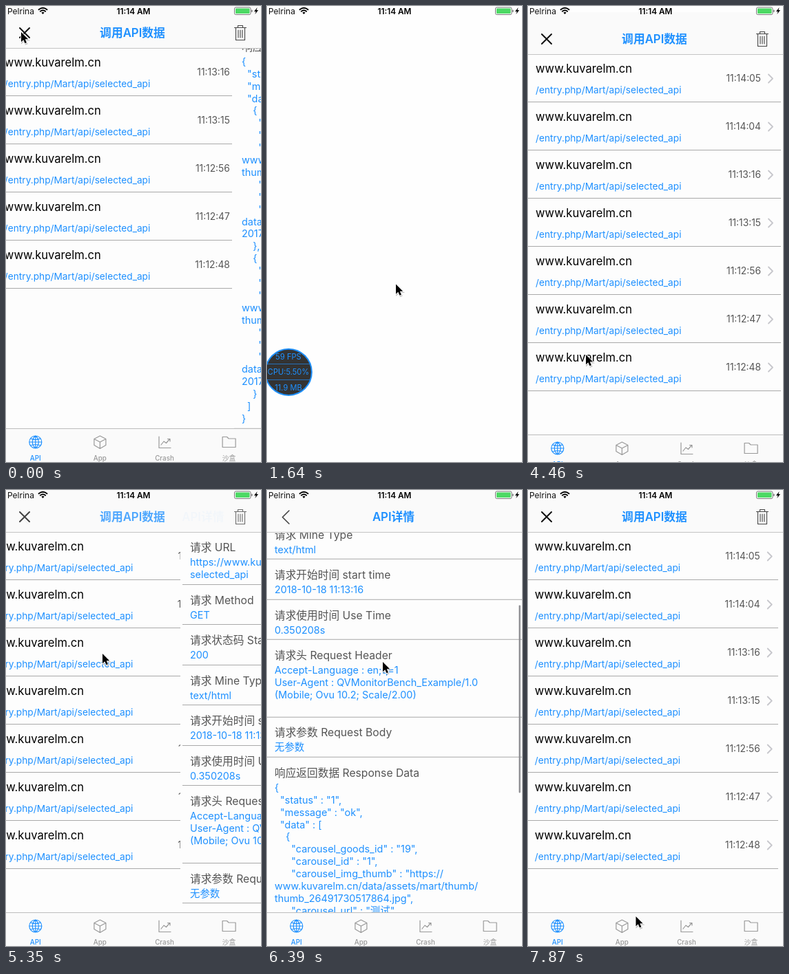
Animation of 370x663 px, one loop 8000 ms. Source, as an HTML page:

```html
<!DOCTYPE html>
<html lang="zh">
<head>
<meta charset="utf-8">
<title>API debugger</title>
<style>
  html, body { margin: 0; width: 100%; height: 100%; overflow: hidden; background: #fefefe; }
  svg { display: block; }
  text { white-space: pre; font-family: Inter, "Noto Sans CJK SC", "Noto Sans CJK", sans-serif; }
  .line { fill: none; stroke-linecap: round; stroke-linejoin: round; }
</style>
</head>
<body>
<svg id="stage" width="370" height="663" viewBox="0 0 370 663"></svg>
<script>
const W = 370, H = 663, TOP = 61, BOTTOM = 614;
const LOOP = 8000, BEAT = 148.5;   // the picture refreshes once per beat
const BLUE = '#1e90ff', INK = '#555', RULE = '#a9a9a9', BAR = '#fafafa', PAGE = '#fdfdfd', DIM = '#999';
const HOST = 'www.kuvarelm.cn', ROUTE = '/entry.php/Mart/api/', CALL = 'selected_api';
const TIMES = ['11:14:05', '11:14:04', '11:13:16', '11:13:15', '11:12:56', '11:12:47', '11:12:48'];

// y is the visual middle of the line
const text = (x, y, str, size, fill, more = '') =>
  `<text x="${x}" y="${(y + size * .36).toFixed(2)}" font-size="${size}" fill="${fill}" ${more}>${str}</text>`;
const rect = (x, y, w, h, fill, more = '') =>
  `<rect x="${x}" y="${y}" width="${w}" height="${h}" fill="${fill}" ${more}/>`;
const rule = (y, fill = RULE) => rect(0, Math.floor(y), W, 1, fill);
const path = (d, stroke, width) =>
  `<path class="line" d="${d}" stroke="${stroke}" stroke-width="${width}"/>`;
const group = (id, body) => `<g id="${id}">${body}</g>`;
const MID = 'text-anchor="middle"';

const rows = times => times.map((time, i) => {
  const y = TOP + 70 * i;
  return text(11, y + 21, HOST, 16.6, '#000')
    + text(11, y + 52, ROUTE + CALL, 13.7, BLUE)
    + text(338, y + 35, time, 13.8, INK, 'text-anchor="end"')
    + path(`M349 ${y + 29.5}l6 6l-6 6`, '#c7c7cc', 1.8)
    + rule(y + 69);
}).join('');

const item = (goods, id, thumb, url, img) => `    {
      "carousel_goods_id" : "${goods}",
      "carousel_id" : "${id}",
      "carousel_img_thumb" : "https://
${HOST}/data/assets/mart/thumb/
thumb_${thumb}.jpg",
      "carousel_url" : "${url}",
      "is_goods_id" : 1,
      "carousel_img" : "https://${HOST}/
data/assets/mart/
${img}.png"
    }`;

const SECTIONS = [
  ['请求 URL', `https://${HOST}${ROUTE}\n${CALL}`],
  ['请求 Method', 'GET'],
  ['请求状态码 Status Code', '200'],
  ['请求 Mine Type', 'text/html'],
  ['请求开始时间 start time', '2018-10-18 11:13:16'],
  ['请求使用时间 Use Time', '0.350208s'],
  ['请求头 Request Header',
    'Accept-Language : en;q=1\nUser-Agent : QVMonitorBench_Example/1.0\n(Mobile; Ovu 10.2; Scale/2.00)\n'],
  ['请求参数 Request Body', '无参数'],
  ['响应返回数据 Response Data', `{
  "status" : "1",
  "message" : "ok",
  "data" : [
${item('19', '1', '26491730517864', '测试', '20170604/7c20e8416a93b')},
${item('117', '3', '26491730683920', '', '20170428/3e81a6d904f57')}
  ]
}`]
];

let pageEnd = TOP;
function section([label, value]) {
  const y = pageEnd, lines = value.split('\n'), lead = 17.9;
  pageEnd += 40.6 + lead * lines.length;
  return text(11, y + 22.8, label, 15.7, INK)
    + lines.map((s, i) => text(11, y + 44.3 + lead * i, s, 14.4, BLUE)).join('')
    + rule(pageEnd);
}
const page = SECTIONS.map(section).join('');
const MAX_SCROLL = pageEnd - BOTTOM;

function navBar() {
  const heading = str => text(183.5, 39, str, 16.8, BLUE, MID + ' font-weight="600"');
  const cross = path('M20 32l14 14m0-14l-14 14', '#111', 2);
  const bin = path('M331.5 31.5h17m-12 0v-3h7v3m-10 .5v17.5h13v-17.5m-9.5 3v11m3-11v11m3-11v11', '#444', 1.1);
  return rect(0, 0, W, TOP, BAR) + rule(TOP, '#c4c4c4')
    + group('listNav', cross + heading('调用API数据') + bin)
    + group('detailNav', path('M32 30l-9.5 9.5l9.5 9.5', '#444', 1.6) + group('detailTitle', heading('API详情')));
}

// Icons are drawn around their own centre
const TABS = [
  ['API', 'M-9 0a9 9 0 0 1 18 0a9 9 0 0 1-18 0h18M0-9v18M0-9c-6 5-6 13 0 18c6-5 6-13 0-18M-7-5q7 3 14 0M-7 5q7-3 14 0'],
  ['App', 'M0-9l8.5 4.5v9l-8.5 5l-8.5-5v-9zM-8.5-4.5l8.5 4.5l8.5-4.5M0 0v9.5'],
  ['Crash', 'M-8-8v16.5h17M-5 4l4-5l3.5 2.5l5-6m-3 0h3.5v3.5'],
  ['沙盒', 'M-9.5 7.5v-15h6.5l2.5 2.5h10v12.5z']
];

function tabBar() {
  return rect(0, BOTTOM, W, H - BOTTOM, BAR) + rule(BOTTOM, '#bcbcbc')
    + TABS.map(([label, icon], i) => {
      const x = 42.8 + 93.6 * i, color = i ? DIM : BLUE;
      return `<g transform="translate(${x} 634)">${path(icon, color, 1.2)}</g>`
        + text(x, 657, label, 9.8, color, MID + ' font-weight="500"');
    }).join('');
}

function statusBar() {
  return text(2, 7.3, 'Pelrina', 12, '#111')
    + path('M47.5 5.2q6-5 12 0m-9.7 2.6q3.7-3 7.4 0', '#000', 1.8)
    + '<path d="M51.4 9.6q2.1-1.6 4.2 0l-2.1 2.4z"/>'
    + text(185, 7.3, '11:14 AM', 11.8, '#000', MID + ' font-weight="600"')
    + rect(331.5, 2, 23.5, 10.5, '#fff', 'rx="2" stroke="#777"')
    + rect(333, 3.5, 20.5, 7.5, '#4cd964', 'rx="1"')
    + rect(356, 5.5, 1.5, 3.5, '#777', 'rx=".7"')
    + '<path d="M364.6 2l-4.6 6h2.6l-1.2 4l4.6-6h-2.6z"/>';
}

function ballView() {
  return `<circle cx="31.3" cy="532.3" r="33.6" fill="#333" stroke="${BLUE}" stroke-width="2"/>`
    + [520, 543].map(y => rect(0, y, 64, 1, BLUE, 'opacity=".65"')).join('')
    + [0, 1, 2].map(i => text(31, 509.5 + 22.8 * i, '', 11.1, BLUE, MID + ' class="stat"')).join('');
}

const ARROW = 'M0 0V14.2L3.3 11.2L5.5 16.3L7.9 15.3L5.8 10.3H10.2Z';
document.getElementById('stage').innerHTML =
  `<clipPath id="view">${rect(0, TOP + 1, W, BOTTOM - TOP - 1, '#000')}</clipPath>`
  + rect(0, 0, W, H, '#fefefe')
  + group('modal',
    rect(0, 0, W, H, PAGE)
    + '<g clip-path="url(#view)">'
    + group('list', group('oldList', rows(TIMES.slice(2))) + group('newList', rows(TIMES)))
    + group('detail', rect(-3, TOP, W + 3, BOTTOM - TOP, PAGE) + group('page', page)
      + group('thumb', rect(365.5, 64, 2.3, 273, '#8a8a8e', 'rx="1.1"')))
    + '</g>' + navBar() + tabBar())
  + group('ball', ballView())
  + statusBar()
  + group('pointer', `<path d="${ARROW}" transform="translate(.8 1.4)" opacity=".22" stroke="#000" stroke-width="1.6"/>`
    + `<path d="${ARROW}" stroke="#fff" stroke-width="1.8" paint-order="stroke"/>`);

const clamp = v => Math.max(0, Math.min(1, v));
const smooth = v => { v = clamp(v); return v * v * (3 - 2 * v); };
// Critically damped spring from 0 to 1, d in beats since its start
const spring = d => d > 0 ? 1 - (1 + 2.8 * d) * Math.exp(-2.8 * d) : 0;

// Beat, x, y
const POINTER = [[0, 22, 38], [4, 22, 38], [7, 165, 425], [9, 165, 425], [11, 187, 404.5],
  [19, 187, 404.5], [20, 165, 415.5], [26, 25, 515], [28, 25, 515], [30, 84, 507], [34, 140, 238],
  [36, 140, 238], [40, 174, 467], [41, 174, 467], [43, 168, 250], [47, 39.5, 53], [49, 25, 42],
  [51, 25, 42], [53, 156.5, 620]];

function pointerAt(b) {
  const i = Math.max(1, POINTER.findIndex(k => k[0] >= b));
  const [b0, x0, y0] = POINTER[i - 1], [b1, x1, y1] = POINTER[i], f = (b - b0) / (b1 - b0);
  return [x0 + (x1 - x0) * f, y0 + (y1 - y0) * f];
}

function statsAt(b) {
  if (b < 11) return ['60 FPS', 'CPU:7.20%', '11.8 MB'];
  if (b < 16) return ['59 FPS', 'CPU:5.50%', '11.9 MB'];
  return ['60 FPS', 'CPU:3.90%', '12.1 MB'];
}

const el = id => document.getElementById(id);
const move = (id, x, y) => el(id).setAttribute('transform', `translate(${x} ${y})`);
const fade = (id, v) => el(id).setAttribute('opacity', clamp(v));
const stats = document.querySelectorAll('.stat');

function draw(b) {
  const closed = spring(b + 1.36) - spring(b - 35.6) + spring(b - 50.64);
  const hidden = spring(b - 3.6) - spring(b - 27.77);
  const second = b >= 20;
  const scroll = second ? smooth((b - 40.5) / 6) : 1;
  move('modal', 0, Math.round(H * hidden));
  move('detail', Math.round(W * closed), 0);
  move('list', W * (closed - 1) / 3, 0);
  move('page', 0, -MAX_SCROLL * scroll);
  move('thumb', 0, 275 * scroll);
  move('detailTitle', W * closed * .4, 0);
  move('pointer', ...pointerAt(b));
  fade('thumb', b > 40 && b < 49);
  fade('listNav', (closed - .3) / .5);
  fade('detailNav', 1 - closed * 1.4);
  fade('oldList', !second);
  fade('newList', second);
  fade('ball', b >= 7 && b < 28);
  statsAt(b).forEach((s, i) => { stats[i].textContent = s; });
}

let shown = -1;
function tick() {
  const beat = Math.floor(performance.now() % LOOP / BEAT + .06);
  if (beat !== shown) draw(shown = beat);
  requestAnimationFrame(tick);
}
tick();
</script>
</body>
</html>
```
